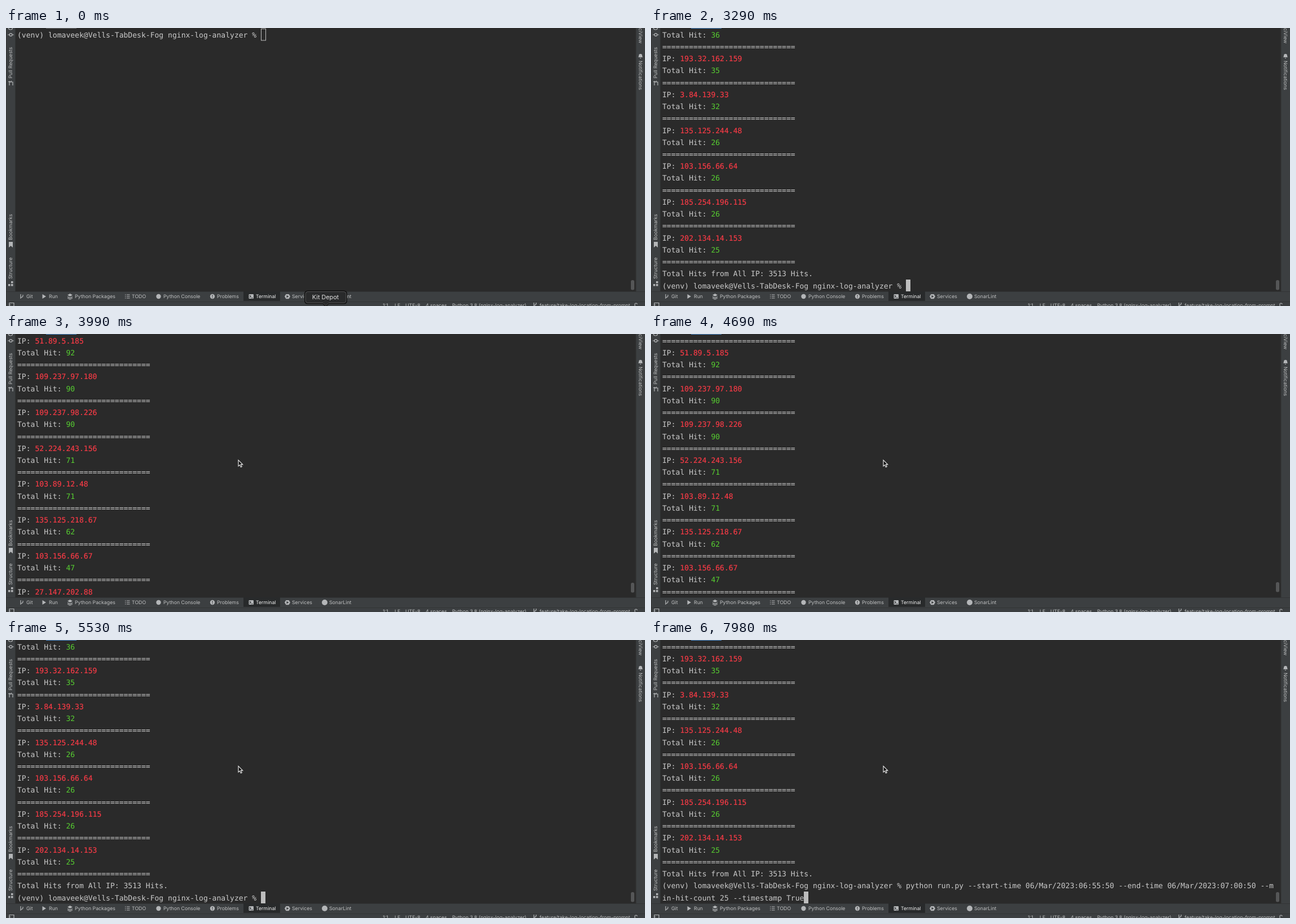
An HTML page for the animation above (8000 ms loop, 1133 by 494 pixels).

```html
<!DOCTYPE html>
<html lang="en">
<head>
<meta charset="utf-8">
<title>Log analyzer terminal</title>
<style>
  html, body { margin: 0; width: 100%; height: 100%; overflow: hidden; background: #2a2a2a; }
  svg { display: block; }
  text { white-space: pre; }
  #screen { font: 13.06px "DejaVu Sans Mono", monospace; fill: #cacaca; text-rendering: geometricPrecision; }
  #screen .ip { fill: #f53b46; stroke: #f53b46; stroke-width: .2; }
  #screen .hits { fill: #57cf31; }
  .ui { font: 8.75px Inter, sans-serif; fill: #bfc0c1; text-rendering: geometricPrecision; }
  .line { fill: none; stroke: #b4b6b8; stroke-width: 1.2; }
  .solid { fill: #b4b6b8; }
</style>
</head>
<body>
<svg width="1133" height="494" viewBox="0 0 1133 494">
  <rect width="1133" height="494" fill="#2a2a2a"/>
  <path d="M0 0h16v468h1101V0h16v494H0z" fill="#3c3f41"/>
  <path d="M.5 0v494M16.5 0v468M1117 0v468M0 468.5h1133M0 486.5h1133" stroke="#323435" fill="none"/>
  <rect x="421" y="468" width="65" height="17" fill="#282a2b"/>
  <rect id="tab" x="71" y="0" width="54" height="1"/>
  <rect id="thumb" x="1108" width="6" height="17.500" rx="2.500" fill="#555657"/>

  <g id="labels" class="ui"></g>

  <g class="line">
    <path d="M4.5 0a3.5 3 0 0 0 7 0M3 12h3M11 12h3"/>
    <circle cx="8.5" cy="12" r="2.4"/>
    <path d="M6 94v8M4 95.500h4M12 102v-6h-4l2-2"/>
    <path d="M26 473v8M30 474v2q0 2-4 3"/>
    <path d="M214 474h5.500M214 477h5.500M214 480h5.500M211 474h1.500M211 477h1.500M211 480h1.500"/>
    <path d="M936 488v6M940 488v2q0 2-4 3"/>
    <path d="M6 488.500h8v8h-8zM5 492h3"/>
    <path d="M1115 494v-3a2 2 0 0 1 4 0"/>
  </g>
  <g class="solid">
    <path d="M5 380h7v10l-3.500-3-3.500 3z"/>
    <path d="M9 450h3.500v3.500H9zM4 455h3.500v3.500H4zM9 455h3.500v3.500H9z"/>
    <path d="M1121 52q1-1 1-3a3 3 0 0 1 6 0q0 2 1 3zM1123.500 53h3l-1.500 1.500z"/>
    <path d="M64.500 473l6.500 4-6.500 4z"/>
    <path d="M109 474.500l4.500-2.500 4.500 2.500-4.500 2.500zM109 477l4.500 2 4.500-2v1.200l-4.500 2.300-4.500-2.300zM109 479.500l4.500 2 4.500-2v1l-4.500 2.300-4.500-2.300z"/>
    <circle cx="270.500" cy="477" r="4.200"/>
    <circle cx="366" cy="477" r="4.200"/>
    <rect x="430.500" y="473" width="8.500" height="8" rx="1"/>
    <path d="M496.500 473h5l2.500 4-2.500 4.300h-5l-2.500-4.300z"/>
    <circle cx="565" cy="477" r="5"/>
  </g>
  <path d="M366 474.500v3M366 478.800v1.200M432 475l2 2-2 2M435 479.500h2.500" stroke="#313335" stroke-width="1.200" fill="none"/>
  <path d="M497.500 474.800l4 2.300-4 2.300z" fill="#3c3f41"/>

  <g id="screen"></g>

  <g id="tooltip">
    <path d="M535 467.500h64q5 0 5 5v12q0 5-5 5h-27l-5 5-5-5h-27q-5 0-5-5v-12q0-5 5-5z" fill="#292a2b" stroke="#111" stroke-width="2"/>
    <path d="M535 468.500h64q4 0 4 4v12q0 4-4 4h-27l-5 5-5-5h-27q-4 0-4-4v-12q0-4 4-4z" fill="none" stroke="#626364" stroke-width=".8"/>
    <text x="566.500" y="482" text-anchor="middle" style="font:10.8px Inter,sans-serif" fill="#e4e4e4">Kit Depot</text>
  </g>
  <path id="mouse" d="M1 1.200v10.600l2.500-2.200 1.800 4 1.900-.8-1.800-3.900h3.300z" fill="#111" stroke="#f0f0f0" stroke-width="1.100"/>
</svg>
<script>
const LOOP = 8000, ROWS = 22, ROW_H = 21.24, LEFT = 20, CELL = 7.864, COLS = 138;
const PROMPT = '(venv) lomaveek@Vells-TabDesk-Fog nginx-log-analyzer % ';
const RULE = '='.repeat(30);
const HIT = 'python run.py --min-hit-count 25';
const LOG = 'python run.py --log-path ../../access.log';
const RANGE = 'python run.py --start-time 06/Mar/2023:06:55:50 --end-time 06/Mar/2023:07:00:50 --min-hit-count 25 --timestamp True';

const ENTRIES = `51.89.5.185 92,109.237.97.180 90,109.237.98.226 90,52.224.243.156 71,103.89.12.48 71,
135.125.218.67 62,103.156.66.67 47,27.147.202.88 36,193.32.162.159 35,3.84.139.33 32,
135.125.244.48 26,103.156.66.64 26,185.254.196.115 26,202.134.14.153 25`.split(',').map(e => e.trim().split(' '));
const OUTPUT_END = ENTRIES.length * 3;

// Timelines: [start in ms, value]
const TYPED = [[0, ''], [840, 'clear'], [1330, HIT], [2730, ''], [6020, HIT], [6300, 'clear'],
  [6650, HIT], [7140, 'clear'], [7560, LOG], [7910, RANGE]];
const SCROLL = [[0, 22], [2730, -30], [2800, 22], [3640, 18], [3710, 12], [3780, 6], [3850, 2], [3920, 0],
  [4340, -3], [4620, -2], [4690, -1], [4760, 2], [4830, 5], [4900, 7], [5390, 12], [5460, 18], [5530, 22], [7910, 23]];
const MOUSE = [[0, null], [280, [570, 440]], [350, [578, 385]], [420, [585, 340]], [490, [590, 318]],
  [560, [592, 312]], [840, [603, 315.5]], [3290, null], [3640, [411, 223]]];
const TOOLTIP = [[0, 1], [280, .6], [350, .25], [420, 0]];

const $ = id => document.getElementById(id);
const at = (timeline, t) => timeline.findLast(([start]) => start <= t)[1];

function label(x, y, text, turn = 0, anchor = 'start') {
  $('labels').innerHTML += `<text transform="translate(${x} ${y}) rotate(${turn})" text-anchor="${anchor}">${text}</text>`;
}
[[36, 'Git'], [76, 'Run'], [122, 'Python Packages'], [223, 'TODO'], [279, 'Python Console'], [374, 'Problems'],
 [443, 'Terminal'], [507, 'Services'], [573, 'SonarLint']].forEach(([x, s]) => label(x, 480, s));
[[668, '1:1'], [689, 'LF'], [708, 'UTF-8'], [744, '4 spaces'], [791, 'Python 3.8 (nginx-log-analyzer)'],
 [946, 'feature/take-log-location-from-prompt']].forEach(([x, s]) => label(x, 495.6, s));
[[89.5, 'Pull Requests'], [377, 'Bookmarks'], [446, 'Structure']].forEach(([y, s]) => label(11, y, s, -90));
label(1122, 27.5, 'SciView', 90, 'end');
label(1122, 58, 'Notifications', 90);
$('labels').children[6].setAttribute('fill', '#f2f2f2');

function entry(n) {
  if (n >= 0) return ENTRIES[n];
  const part = k => 11 + (n * n * 37 + k * 83 - n * k * 29) % 240;
  return [[1, 2, 3, 4].map(part).join('.'), 92 - n * 7];
}

function outputLine(i) {
  if (i === OUTPUT_END) return 'Total Hits from All IP: 3513 Hits.';
  const n = Math.floor(i / 3), [ip, hits] = entry(n);
  return [`IP: <tspan class="ip">${ip}</tspan>`, `Total Hit: <tspan class="hits">${hits}</tspan>`, RULE][i - n * 3];
}

const textRow = (row, s) => `<text x="${LEFT}" y="${(16.6 + row * ROW_H).toFixed(2)}">${s}</text>`;

function cursor(col, row, focused) {
  const x = Math.floor(LEFT + col * CELL), y = Math.round(1 + row * ROW_H);
  return focused
    ? `<rect x="${x}" y="${y}" width="8" height="21" fill="#bdbdbd"/>`
    : `<rect x="${x + .5}" y="${y + .5}" width="8" height="20.500" fill="none" stroke="#bdbdbd"/>`;
}

function screen(t) {
  const input = PROMPT + at(TYPED, t), focused = t >= 420;
  if (t < 2730) {
    const first = textRow(0, input);
    if (t >= 2520) return first + cursor(0, 1, true);
    return t >= 2380 ? first : first + cursor(input.length, 0, focused);
  }
  const top = at(SCROLL, t), inputLines = [input.slice(0, COLS), input.slice(COLS)];
  let html = '';
  for (let row = 0; row < ROWS; row++) {
    const i = top + row;
    html += textRow(row, i <= OUTPUT_END ? outputLine(i) : inputLines[i - OUTPUT_END - 1]);
  }
  const cursorRow = OUTPUT_END + 1 + Math.floor(input.length / COLS) - top;
  return cursorRow < ROWS ? html + cursor(input.length % COLS, cursorRow, true) : html;
}

let shown = '';
function draw() {
  const t = performance.now() % LOOP, html = screen(t), mouse = at(MOUSE, t);
  if (html !== shown) $('screen').innerHTML = shown = html;
  const above = t < 2800 ? 0 : Math.max(0, 22 - at(SCROLL, t));
  $('thumb').setAttribute('y', 448 - Math.round(above * 6.5 / 23));
  $('tab').setAttribute('fill', t < 420 ? '#6c6e70' : '#4a88c7');
  $('tooltip').setAttribute('opacity', at(TOOLTIP, t));
  $('mouse').setAttribute('visibility', mouse ? 'visible' : 'hidden');
  if (mouse) $('mouse').setAttribute('transform', `translate(${mouse})`);
  requestAnimationFrame(draw);
}
draw();
</script>
</body>
</html>
```
